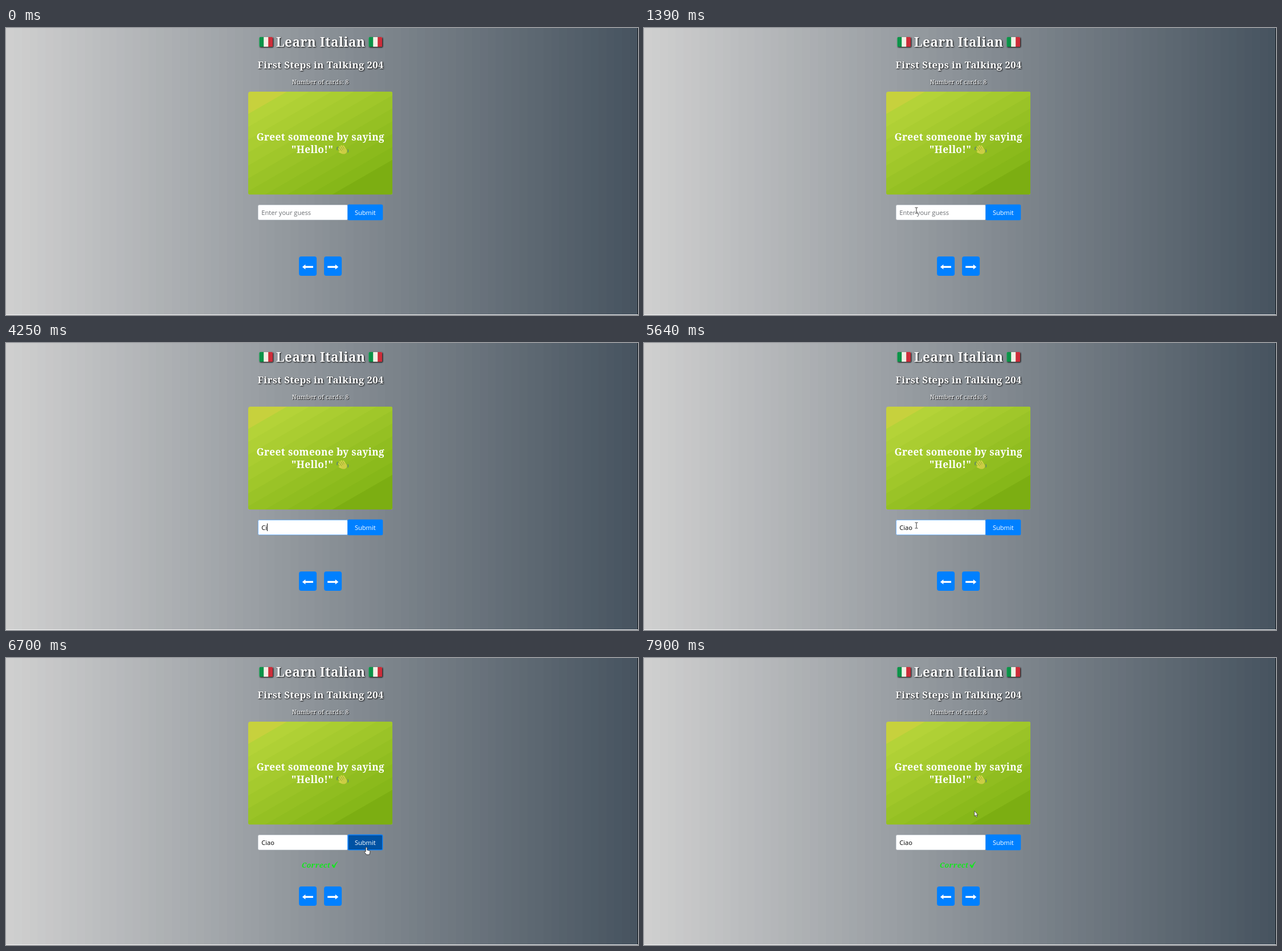
An HTML page that plays this animation: 1109 px wide and 505 px high, repeating every 8000 ms.

```html
<!DOCTYPE html>
<html lang="en">
<head>
<meta charset="utf-8">
<title>Flashcards</title>
<style>
  html, body { margin: 0; width: 100%; height: 100%; overflow: hidden; background: #8b9197; }
  svg { position: absolute; left: 0; top: 0; display: block; }
  .serif { font-family: "Noto Serif", serif; font-weight: 500; fill: #fff; text-anchor: middle; letter-spacing: .022em; }
  .bold { font-weight: 700; }
  .sans { font-family: "Open Sans", "Noto Sans", sans-serif; font-size: 11.1px; font-weight: 500; }
  .deep { filter: drop-shadow(1.6px 1.6px .8px #000); }
  .soft { filter: drop-shadow(1px 1px .5px #000); }
</style>
</head>
<body>
<svg width="1109" height="505" viewBox="0 0 1109 505">
  <defs>
    <clipPath id="cardClip"><rect x="425" y="112" width="253" height="181" rx="4"/></clipPath>
    <clipPath id="flagClip"><rect width="24" height="17.5" rx="2.5"/></clipPath>
    <g id="flag" clip-path="url(#flagClip)">
      <rect width="24" height="17.5" fill="#f3efe6"/>
      <rect width="8" height="17.5" fill="#0b9348"/>
      <rect x="16" width="8" height="17.5" fill="#cd2d3a"/>
    </g>
    <g id="nav">
      <rect x="-15.5" y="-17" width="31" height="34" rx="4" fill="#0080ff"/>
      <path d="M-9.7 1.5L-4.2-2.8V-.1H9.4V3.1H-4.2V5.8Z" fill="#fff"/>
    </g>
  </defs>

  <g id="backdrop"></g>
  <rect x="1108" width="1" height="505" fill="#11161b"/>
  <rect y="504" width="1109" height="1" fill="#f2f2f2"/>

  <g class="deep">
    <use href="#flag" x="444.2" y="15.8"/>
    <use href="#flag" x="636.2" y="15.8"/>
    <text class="serif bold" x="552.2" y="33" font-size="22.6">Learn Italian</text>
    <text class="serif bold" x="552.2" y="70.5" font-size="16.8">First Steps in Talking 204</text>
  </g>
  <text class="serif soft" x="551.7" y="98.7" font-size="10.5">Number of cards: 8</text>

  <g id="card" clip-path="url(#cardClip)"></g>
  <text class="serif bold" x="551.7" y="197.5" font-size="17.2">Greet someone by saying</text>
  <text class="serif bold" x="537.5" y="220" font-size="17.2">"Hello!"</text>
  <g transform="translate(590.5 214.5) rotate(-32)" fill="none" stroke-linecap="round">
    <path d="M-4-5V2M-1-7V2M2-7V2M4.8-5V3M-6.5 0L-3 5" stroke="#d3d548" stroke-width="2.4"/>
    <ellipse cx="1" cy="3.5" rx="5.1" ry="4.8" fill="#cccd44"/>
    <path d="M-2.5-5V0M.5-6V0M3.4-5V0" stroke="#8f9a30" stroke-width=".7"/>
    <path d="M-4.5-8.8Q-7.5-8-7.8-4.8M6 8.4Q8.2 7 8.3 4.5" stroke="#5c8276" stroke-width="1.4"/>
  </g>

  <rect x="442.5" y="311.5" width="157" height="26" rx="2" fill="#fff" stroke="#d3d8de"/>
  <rect id="focus" x="442.5" y="311.5" width="157" height="26" rx="2" fill="none" stroke="#78b7fb"/>
  <text id="hint" class="sans" x="448.3" y="329" fill="#6a6d71">Enter your guess</text>
  <text id="typed" class="sans" x="448.3" y="329" fill="#000"></text>
  <rect id="caret" y="317.5" width="1" height="13.5" fill="#111"/>

  <rect x="599.3" y="310.5" width="62" height="27.7" rx="2.5" fill="#0080ff"/>
  <rect id="hover" x="601" y="312" width="59" height="25" rx="1" fill="#0052a3"/>
  <text class="sans" x="630.3" y="329" fill="#fff" text-anchor="middle">Submit</text>

  <g id="result" fill="#12e81c">
    <text class="serif bold" x="544" y="369" font-size="12.6" font-style="italic" style="fill:#12e81c">Correct</text>
    <path d="M571.5 364.2L573.6 362.8 575.4 366Q578 360.2 582.8 357.5 578.8 362.5 576.4 369.3H574.4Z"/>
  </g>

  <use href="#nav" transform="translate(529.6 418.9)"/>
  <use href="#nav" transform="translate(573.6 418.9) scale(-1 1)"/>

  <g id="cursor">
    <path id="arrow" d="M0 0V9.2L2 7.4 3.5 10.8 5 10.1 3.6 6.9H6.3Z" fill="#fff" stroke="#222" stroke-width=".7"/>
    <path id="beam" d="M-2.5-5H-.7L0-4.4 .7-5H2.5M0-4.4V4.4M-2.5 5H-.7L0 4.4 .7 5H2.5" fill="none" stroke="#333"/>
    <path id="hand" d="M-1.3 .9Q0-1.1 1.3 .9V5L5.4 6Q6.7 6.5 6.4 8.2L5.3 13H0L-3.4 8.5Q-3.6 6.9-2.1 7.2L-1.3 8Z" fill="#fff" stroke="#222" stroke-width=".8"/>
  </g>
</svg>
<script>
const LOOP = 8000, STEP = 66.6;
const $ = id => document.getElementById(id);
const clamp = v => Math.max(0, Math.min(1, v));
const mix = (a, b, k) => a.map((v, i) => v + (b[i] - v) * k);
const rgb = c => `rgb(${c.map(Math.round)})`;
const show = (id, on) => $(id).setAttribute("visibility", on ? "visible" : "hidden");

function addRect(parent, x, y, width, height, fill) {
  const r = document.createElementNS("http://www.w3.org/2000/svg", "rect");
  for (const [k, v] of Object.entries({ x, y, width, height, fill })) r.setAttribute(k, v);
  parent.append(r);
  return r;
}

// Finely banded page gradient
const BANDS = 80;
for (let i = 0; i < BANDS; i++) {
  const x = Math.round(i * 1109 / BANDS);
  addRect($("backdrop"), x, 0, 1109 - x, 505, rgb(mix([208, 208, 208], [70, 83, 95], (i + .5) / BANDS)));
}

// Card stripes run 30 degrees up to the right
function stripe(from, color) {
  addRect($("card"), -400, from, 900, 400, color)
    .setAttribute("transform", "translate(425 112) rotate(-30)");
}
const STRIPES = 10;
stripe(-1, "#c7d13d");
for (let i = 0; i < STRIPES; i++)
  stripe(34 + i * 196.4 / STRIPES, rgb(mix([180, 211, 56], [134, 183, 25], i / (STRIPES - 1))));
stripe(230.4, "#7cae12");

// Pointer paths: start, end, evenly timed points
const moves = [
  [120, 920, [[976, 471], [790, 400], [560, 305], [400, 284], [359, 282], [420, 292], [470, 303]]],
  [990, 1390, [[473, 312], [476, 317], [478, 321]]],
  [5640, 6440, [[478, 321], [520, 325], [575, 330], [617.5, 333], [632.5, 333]]],
  [7370, 7900, [[632.5, 333], [626, 325], [616, 312], [600, 294], [561, 246]]]
];
const typing = [[0, "", 448], [3850, "C", 455], [4250, "Ci", 458], [4460, "Cia", 464], [4650, "Ciao", 470]];
const blinks = [1920, 2460, 2990, 3520, 3850, 4050, 4250, 5180, 5710, 6310];

function pointer(t) {
  const move = moves.filter(m => t >= m[0]).pop();
  if (!move || (t >= 3850 && t < 5640)) return null;
  const [start, end, pts] = move;
  const held = Math.floor((t - start) / STEP + .01) * STEP;
  const pos = clamp(held / (end - start)) * (pts.length - 1);
  const i = Math.min(Math.floor(pos + .001), pts.length - 2);
  return mix(pts[i], pts[i + 1], Math.min(1, pos - i));
}

function shape([x, y]) {
  if (y < 311 || y > 338 || x < 442 || x > 661) return "arrow";
  return x < 600 ? "beam" : "hand";
}

function draw(t) {
  const p = pointer(t);
  const kind = p && shape(p);
  for (const id of ["arrow", "beam", "hand"]) show(id, id === kind);
  if (p) $("cursor").setAttribute("transform", `translate(${p})`);

  const [, text, caretX] = typing.filter(s => t >= s[0]).pop();
  $("typed").textContent = text;
  show("hint", !text);
  $("caret").setAttribute("x", caretX);
  show("caret", blinks.filter(b => t >= b).length % 2);

  $("focus").setAttribute("opacity", t < 6570 ? clamp((t - 1850) / 140) * (t >= 1920) : 0);
  $("hover").setAttribute("opacity", clamp((t - 6250) / 180) * (1 - clamp((t - 7500) / 180)));
  show("result", t >= 6570);
}

const begin = performance.now();
function tick() {
  draw((performance.now() - begin) % LOOP);
  requestAnimationFrame(tick);
}
draw(0);
requestAnimationFrame(tick);
</script>
</body>
</html>
```
